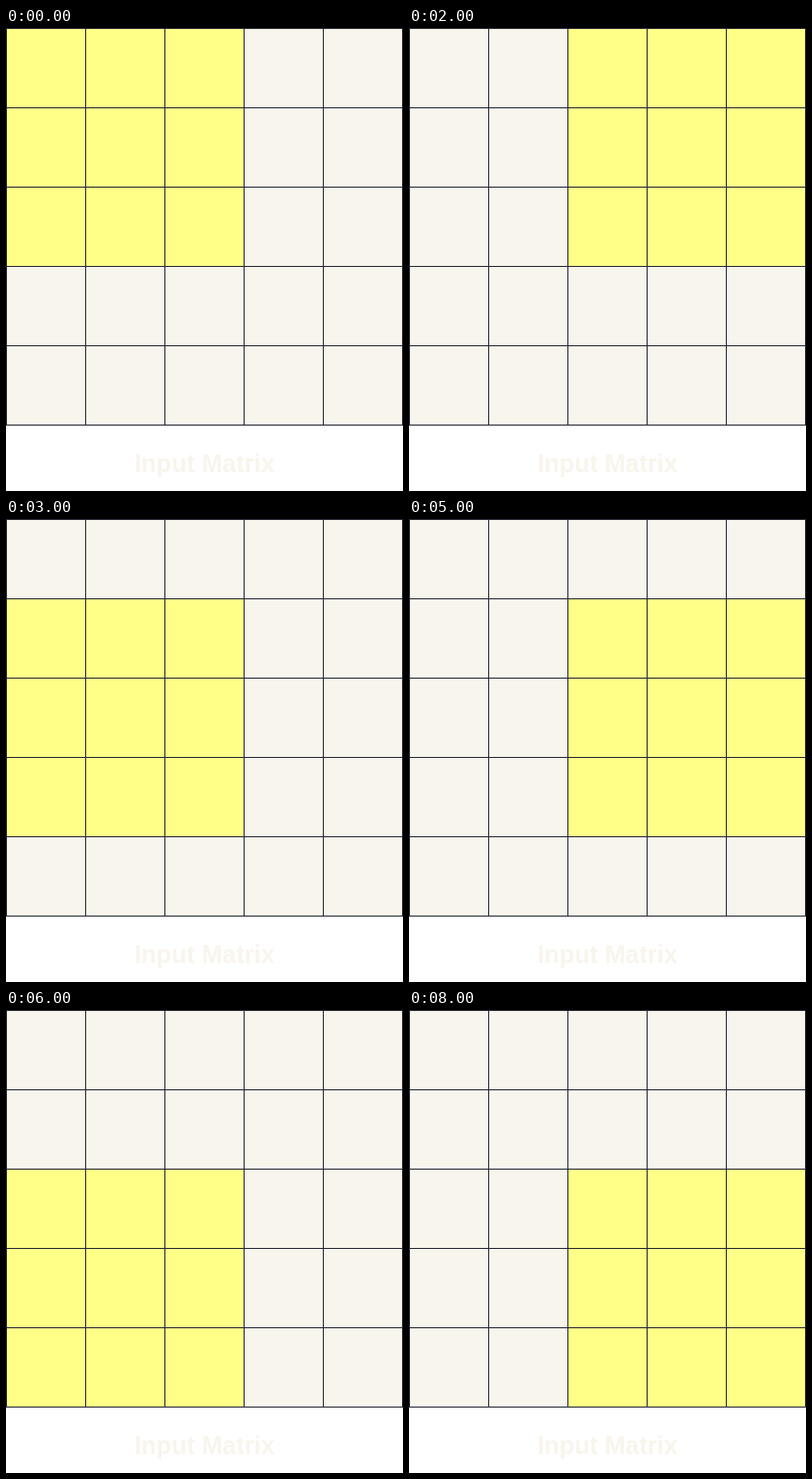
These frames come from a looping animation (401x467 px, 9 s). An HTML page:

```html
<!DOCTYPE html>
<html lang="en">
<head>
<meta charset="utf-8">
<title>Input Matrix</title>
<style>
html, body { margin: 0; width: 100%; height: 100%; overflow: hidden; background: #fff; }
svg { display: block; }
text { font: bold 25px "Liberation Sans", Arial, sans-serif; fill: #f8f5ec; }
</style>
</head>
<body>
<svg width="401" height="467">
  <rect width="401" height="401" fill="#f8f5ec"/>
  <rect id="kernel" width="240" height="240" fill="#ffff88"/>
  <path id="grid" fill="none" stroke="#282a36" shape-rendering="crispEdges"/>
  <text x="200.5" y="448" text-anchor="middle">Input Matrix</text>
</svg>
<script>
const CELL = 80, STEP = 1000, STEPS = 9;
const kernel = document.getElementById("kernel");

let lines = "";
for (let i = 0; i <= 5; i++) {
  const p = i * CELL + 0.5;
  lines += `M0 ${p}H401M${p} 0V401`;
}
document.getElementById("grid").setAttribute("d", lines);

// Slide the 3x3 window row by row.
function draw() {
  const step = Math.floor(performance.now() / STEP) % STEPS;
  kernel.setAttribute("x", step % 3 * CELL);
  kernel.setAttribute("y", Math.floor(step / 3) * CELL);
  requestAnimationFrame(draw);
}
draw();
</script>
</body>
</html>
```
